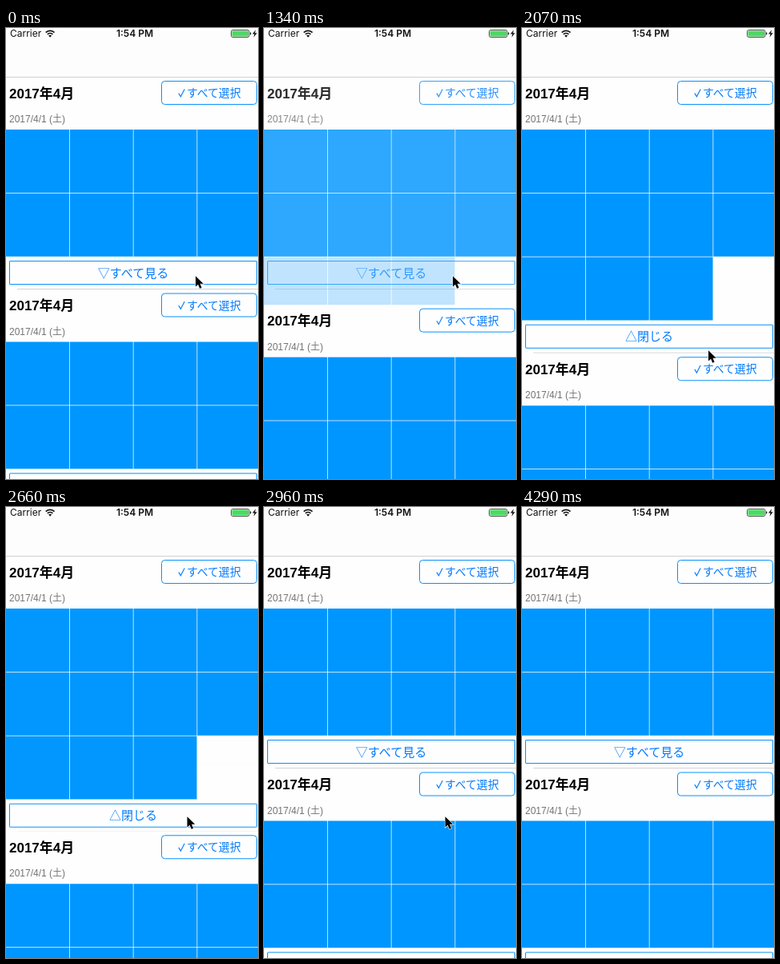
An HTML page that plays this animation: 315x564 px, repeating every 4700 ms.

```html
<!DOCTYPE html>
<html lang="ja">
<head>
<meta charset="utf-8">
<title>Expandable photo list</title>
<style>
  html, body { margin: 0; width: 100%; height: 100%; overflow: hidden; background: #fefefe; }
  svg { display: block; width: 315px; height: 564px; }
  text { font-family: "Liberation Sans", "Noto Sans CJK JP", "Noto Sans CJK", sans-serif; }
  .title { font-size: 17px; font-weight: 700; fill: #000; }
  .date { font-size: 12px; fill: #747474; }
  .label { font-family: "Noto Sans CJK JP", "Noto Sans CJK", sans-serif; font-weight: 300; fill: #007aff; }
  .status { font-family: Inter, sans-serif; font-size: 12px; fill: #111; }
  .tile { fill: #0096ff; }
  .box { fill: none; stroke: #0a90fa; }
  .hair { fill: #c8c7cc; }
</style>
</head>
<body>
<svg viewBox="0 0 315 564">
  <rect width="315" height="564" fill="#fefefe"/>
  <g id="closed"></g>
  <g id="open"></g>
  <g id="next"></g>

  <rect width="315" height="61" fill="#fdfdfd"/>
  <rect class="hair" y="61" width="315" height="1" opacity=".85"/>
  <text class="status" x="5" y="11.3">Carrier</text>
  <g fill="none" stroke="#111" stroke-width="1.7">
    <path d="M49.7 5.7a7.6 7.6 0 0 1 10.8 0M51.8 7.9a4.7 4.7 0 0 1 6.6 0"/>
    <path d="M55.1 11.7l-2-2.1a2.9 2.9 0 0 1 4 0z" fill="#111" stroke="none"/>
  </g>
  <text class="status" x="161" y="11.3" font-weight="600" text-anchor="middle">1:54 PM</text>
  <rect x="281.5" y="2.5" width="22.5" height="9" rx="2" fill="none" stroke="#222" stroke-width=".8"/>
  <rect x="282.5" y="3.5" width="20.5" height="7" rx="1" fill="#4cd964"/>
  <path d="M305 5.3q1.5 .3 1.5 1.7t-1.5 1.7z" fill="#222"/>
  <path d="M312.2 2.2l-4.2 5.4h2.6l-1.2 4.2 4.4-5.6h-2.7z" fill="#111"/>

  <path id="cursor" d="M1 1.2V14.6L4.1 11.7 6.2 16.7 8.6 15.7 6.5 10.8H10.7z"
        fill="#000" stroke="#fff" stroke-width="1.2" paint-order="stroke"/>
</svg>
<script>
const LOOP = 4700, PITCH = 79.75, SECTION = 265.5;
const $ = id => document.getElementById(id);

function cell(tiles) {
  const extra = (Math.ceil(tiles / 4) - 2) * PITCH;
  const label = extra ? '△閉じる' : '▽すべて見る';
  let out = `
    <text class="title" x="4" y="87.5">2017年4月</text>
    <rect class="box" x="194.5" y="66.5" width="119" height="29" rx="4"/>
    <path d="M215.8 81.6l2.6 4.2 4.8-9.4" fill="none" stroke="#007aff" stroke-width="1.1"/>
    <text class="label" x="226" y="86.2" font-size="13.8">すべて選択</text>
    <text class="date" x="4" y="118.2">2017/4/1 (土)</text>`;
  for (let i = 0; i < tiles; i++) {
    const x = i % 4 * PITCH, y = 127 + Math.floor(i / 4) * PITCH;
    out += `<rect class="tile" x="${x}" y="${y}" width="79" height="79"/>`;
  }
  return out + `<g transform="translate(0 ${extra})">
    <rect class="box" x="4.5" y="291.5" width="309" height="29" rx=".5"/>
    <text class="label" x="159" y="311.7" font-size="15" text-anchor="middle">${label}</text>
    <rect class="hair" x="14" y="326" width="301" height=".8"/></g>`;
}

$('closed').innerHTML = cell(8);
$('open').innerHTML = cell(11);
$('next').innerHTML = '<rect y="61.5" width="315" height="300" fill="#fefefe"/>' + cell(8);

// [time, share opened]
const openSteps = [
  [0, 0], [1340, .24], [1480, .94], [1630, 1], [2660, .988], [2810, .37], [2960, 0]
];
// [time, x, y]
const cursorSteps = [
  [0, 236, 309], [290, 235, 309], [1780, 235.5, 320], [1920, 235, 403],
  [2070, 232, 402], [2220, 225.5, 387], [2370, 225.5, 386], [3100, 225.5, 387],
  [3250, 229, 399], [3400, 232, 449], [3540, 246, 528], [3690, 245.5, 529],
  [4140, 245.5, 561], [4290, 245.5, 580]
];

const at = (steps, t) => steps.findLast(s => s[0] <= t);

function draw(t) {
  const p = at(openSteps, t)[1];
  const [, x, y] = at(cursorSteps, t);
  $('closed').setAttribute('opacity', 1 - p);
  $('open').setAttribute('opacity', p);
  $('next').setAttribute('transform', `translate(0 ${SECTION + p * PITCH})`);
  $('cursor').setAttribute('transform', `translate(${x} ${y})`);
}

const start = performance.now();
function tick() {
  draw((performance.now() - start) % LOOP);
  requestAnimationFrame(tick);
}
tick();
</script>
</body>
</html>
```
